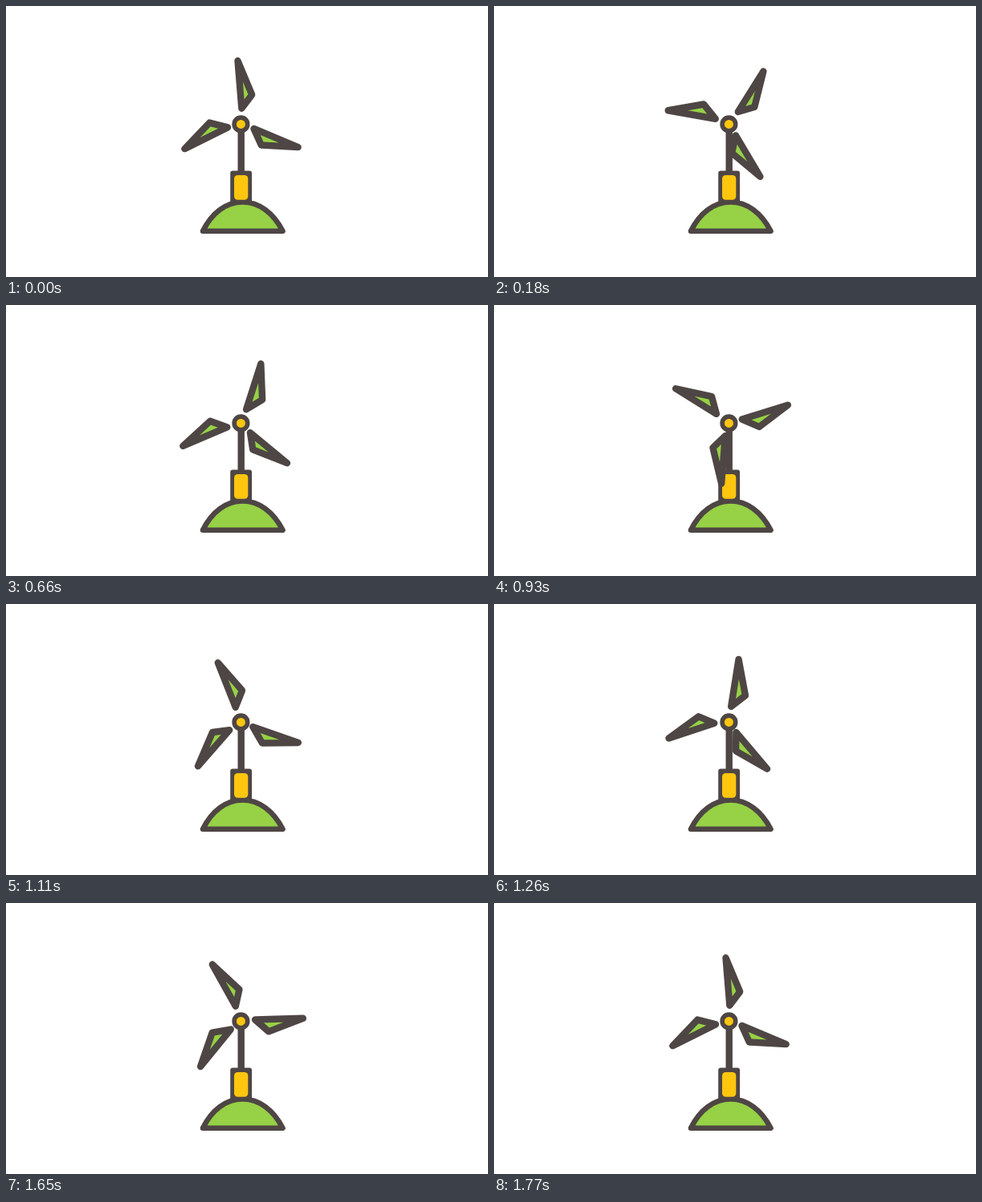
Write an HTML page with a canvas that moves like this. It is 600 px wide and 338 px high and loops after 1.8 s.

```html
<!DOCTYPE html>
<html lang="en">
<head>
<meta charset="utf-8">
<title>Wind turbine</title>
<style>
  html, body { margin: 0; width: 100%; height: 100%; overflow: hidden; background: #fff; }
  canvas { display: block; width: 600px; height: 338px; }
</style>
</head>
<body>
<canvas id="stage" width="600" height="338"></canvas>
<script>
const ctx = document.getElementById('stage').getContext('2d');
const DARK = '#4e4644', GREEN = '#96d146', YELLOW = '#ffc60f';
const LOOP = 1800, STEP = 30, LAST = LOOP / STEP - 1;
const RAD = Math.PI / 180;
const PIVOT = { x: 292, y: 145.7 };

// Each blade: tip, bulge and root as [radius, degrees clockwise from up].
const BLADES = [
  [[77.5, -2.6], [37.8, 22], [18, 4.2]],
  [[77.8, 113], [37.9, 137.2], [18, 113.8]],
  [[76.8, 245], [38.7, 270.2], [17, 250.3]]
];

function paint(fill, width) {
  ctx.fillStyle = fill;
  ctx.fill();
  ctx.lineWidth = width;
  ctx.stroke();
}

function box(x, y, w, h, r, color) {
  ctx.beginPath();
  ctx.roundRect(x, y, w, h, r);
  ctx.fillStyle = color;
  ctx.fill();
}

function drawBase() {
  box(288.5, 154, 8.4, 56, 0, DARK);
  box(279.2, 205.4, 26.8, 41, 3, DARK);

  ctx.beginPath();
  ctx.moveTo(245, 280.8);
  ctx.bezierCurveTo(256, 258, 274, 244.5, 294.6, 244.5);
  ctx.bezierCurveTo(315, 244.5, 333, 258, 344.5, 280.8);
  ctx.closePath();
  paint(GREEN, 6.6);

  box(284, 211, 17.3, 30.8, 4.5, YELLOW);

  ctx.beginPath();
  ctx.arc(292.4, 147.4, 8.3, 0, 2 * Math.PI);
  paint(YELLOW, 5.6);
}

function drawBlade(points, turn) {
  ctx.beginPath();
  for (const [r, deg] of points) {
    const a = (deg + turn) * RAD;
    ctx.lineTo(PIVOT.x + r * Math.sin(a), PIVOT.y - r * Math.cos(a));
  }
  ctx.closePath();
  paint(GREEN, 8.4);
}

function draw(ms) {
  const step = Math.floor((ms % LOOP) / STEP);
  const turn = 360 * step / LAST;
  ctx.fillStyle = '#fff';
  ctx.fillRect(0, 0, 600, 338);
  ctx.strokeStyle = DARK;
  ctx.lineJoin = 'round';
  drawBase();
  for (const blade of BLADES) drawBlade(blade, turn);
}

const start = performance.now();
function tick() {
  draw(performance.now() - start);
  requestAnimationFrame(tick);
}
tick();
</script>
</body>
</html>
```
